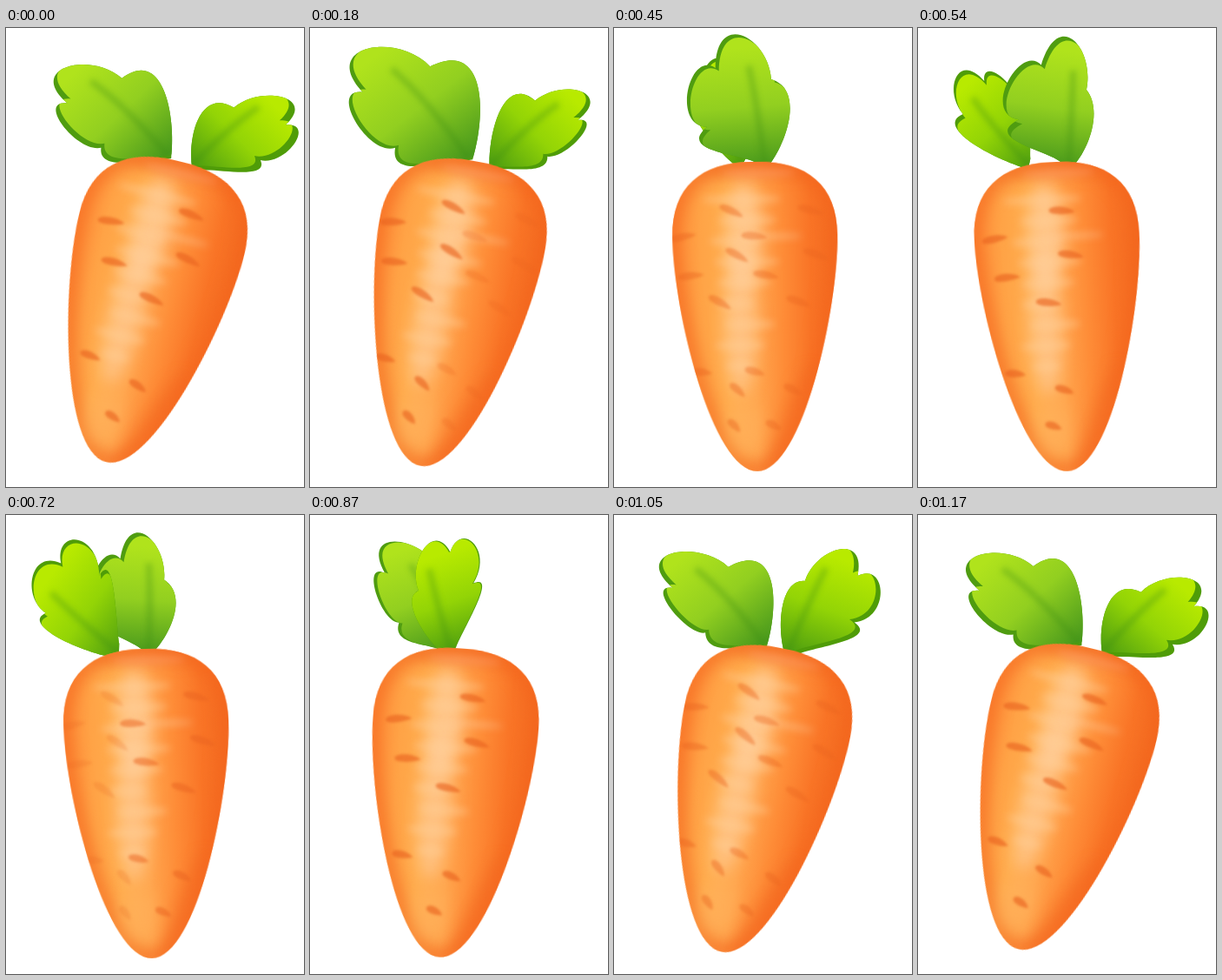
Recreate the animation shown at these times as an HTML page with a canvas. Size 343x528 px, loop 1200 ms.

```html
<!DOCTYPE html>
<html lang="en">
<head>
<meta charset="utf-8">
<title>Spinning carrot</title>
<style>
  html, body { margin: 0; width: 100%; height: 100%; overflow: hidden; background: #fff; }
  canvas { display: block; width: 343px; height: 528px; }
</style>
</head>
<body>
<canvas id="stage" width="343" height="528"></canvas>
<script>
const ctx = document.getElementById('stage').getContext('2d');
const LOOP = 1200, STEP = 30;
const clamp = v => Math.max(0, Math.min(1, v));
const rad = deg => deg * Math.PI / 180;

// A cyclic value: mean, first harmonic (cos, sin), second harmonic (cos, sin).
const wave = (a, [mean, c1 = 0, s1 = 0, c2 = 0, s2 = 0]) =>
  mean + c1 * Math.cos(a) + s1 * Math.sin(a) + c2 * Math.cos(2 * a) + s2 * Math.sin(2 * a);

// Each leaf hangs on four orbiting points: its base, inner lobe, tip and outer lobe.
const leafA = {
  colors: ['#b8ea00', '#93d406', '#4f9f10'], rim: '#4f9c08',
  base: [[176, 50, 8, -4], [159, 3]],
  inner: [[148, 110, 30, -15], [90, -18, -12, 12, 8]],
  tip: [[178, 145, 45, -15], [59, 0, 0, 18, 18]],
  outer: [[218, 130, 25, -18, -12], [80, 42, 30, 10]],
  shift: [[-2, -5], [0, -5]]
};
const leafB = {
  colors: ['#b0e31c', '#92cf20', '#4a9a1c'], rim: '#4f9c10',
  base: [[169, 7, 8, 6], [154, -3]],
  inner: [[178, -24, 5, 2], [58, -22, -10, 10]],
  tip: [[117, -58, 0, 20], [26, 10, -12, 6]],
  outer: [[78, -22, -8, 12], [90, 26, 0, -4]],
  shift: [[4], [0, -5]]
};

const TIP = [.87, .59];
// Lobes as cubic curves between notches, in percent towards the inner and outer lobe.
const LOBES = [
  [[55, -22], [128, -22], [83, 20]],
  [[108, 40], [68, 108], [33, 84]],
  [[24, 118], [-36, 104], [-14, 69]],
  [[-50, 88], [-12, 28], [-5, 8]]
];

function drawLeaf(leaf, angle) {
  const at = ([x, y]) => [wave(angle, x), wave(angle, y)];
  const base = at(leaf.base), inner = at(leaf.inner), tip = at(leaf.tip), outer = at(leaf.outer);
  const [ta, tb] = TIP;
  const flat = (a, b, i) => base[i] + a * (inner[i] - base[i]) + b * (outer[i] - base[i]);
  // Bilinear bend that carries the flat tip onto the real one.
  const map = (a, b) => [0, 1].map(i => flat(a, b, i) + a * b / (ta * tb) * (tip[i] - flat(ta, tb, i)));

  const shape = new Path2D();
  shape.moveTo(...map(.04, -.08));
  for (const lobe of LOBES) shape.bezierCurveTo(...lobe.flatMap(([a, b]) => map(a / 100, b / 100)));
  shape.closePath();

  const light = ctx.createLinearGradient(...tip, ...base);
  leaf.colors.forEach((c, i) => light.addColorStop(.05 + i * .47, c));

  ctx.save();
  ctx.fillStyle = leaf.rim;
  ctx.fill(shape);
  ctx.clip(shape);
  ctx.translate(...at(leaf.shift));
  ctx.fillStyle = light;
  ctx.fill(shape);

  // Soft crease from base towards the tip.
  ctx.filter = 'blur(3px)';
  ctx.strokeStyle = 'rgba(60,140,20,.32)';
  ctx.lineWidth = 7;
  ctx.beginPath();
  ctx.moveTo(...base);
  ctx.quadraticCurveTo(...map(.45, .3), ...map(.64, .55));
  ctx.stroke();
  ctx.restore();
}

// Carrot body, painted once upright around its pivot.
const PIVOT = [163, 309];
const bodyPath = new Path2D('M0-155C60-156 95-128 95-70C95 15 52 201 0 201C-52 201-95 15-95-70C-95-128-60-156 0-155Z');

function paintBody() {
  const cv = document.createElement('canvas');
  cv.width = 200;
  cv.height = 370;
  const g = cv.getContext('2d');
  g.translate(100, 160);
  g.clip(bodyPath);
  const skin = g.createLinearGradient(-95, 0, 95, 0);
  ['#ff8f3a', '#ffa346', '#ffae4e', '#ffa64e', '#fe8c37', '#f97426', '#f36a20']
    .forEach((c, i) => skin.addColorStop(i / 6, c));
  g.fillStyle = skin;
  g.fillRect(-100, -160, 200, 370);

  const blob = (x, y, w, h, color, turn = 0) => {
    g.fillStyle = color;
    g.beginPath();
    g.ellipse(x, y, w, h, turn, 0, 7);
    g.fill();
  };
  g.filter = 'blur(9px)';
  g.strokeStyle = 'rgba(243,100,28,.75)';
  g.lineWidth = 16;
  g.stroke(bodyPath);
  blob(0, -152, 75, 14, 'rgba(243,104,32,.5)');
  blob(40, 150, 14, 70, 'rgba(243,104,32,.5)', .36);
  blob(-13, -70, 20, 62, 'rgba(255,208,158,.75)');
  blob(-18, 30, 18, 85, 'rgba(255,208,158,.65)');
  blob(-16, 150, 20, 34, 'rgba(255,178,95,.55)');

  // Uneven streaks across the highlight.
  g.filter = 'blur(4px)';
  for (let i = 0; i < 9; i++) {
    blob(-15 + 9 * Math.sin(i * 2.3), -112 + i * 24, 38 - i * 2 + 7 * Math.cos(i * 1.9), 5, 'rgba(255,205,150,.5)');
  }
  blob(20, -69, 34, 3, 'rgba(255,200,150,.55)');
  blob(5, -142, 42, 5, 'rgba(255,160,105,.5)');
  return cv;
}
const body = paintBody();

// Spots: height and longitude in degrees at mid-life.
const SPOTS = [[-99, 17], [-70, -38], [-48, 22], [-25, -28], [6, 4], [86, -39], [107, 13], [148, -6]];
const girth = y => 95 * (1 - ((y + 60) / 262) ** 2) ** .75;

function drawSpots(age) {
  const alpha = Math.min(clamp((age - 3) / 3), clamp((18 - age) / 5));
  if (!alpha) return;
  const turned = age - 10, young = 1 - clamp((age - 3) / 5);
  for (const [y, lon] of SPOTS) {
    const x = girth(y) * Math.sin(rad(lon + 6 * turned - lon * .008 * turned ** 2));
    const w = 15 - Math.max(0, y) * .035;
    const slant = lon > -10 ? 45 * young : 0;
    ctx.save();
    ctx.translate(x, y);
    ctx.rotate(rad(7 + y * .07 + x * .2 + slant));
    ctx.globalAlpha = alpha * .65;
    ctx.beginPath();
    ctx.moveTo(-w, 0);
    ctx.bezierCurveTo(-w, -6, w * .4, -6, w, 2);
    ctx.bezierCurveTo(w * .5, 5, -w, 6, -w, 0);
    ctx.fill();
    ctx.restore();
  }
}

function drawCarrot(angle, phase) {
  const sway = Math.cos(angle), lift = ((1 + sway) / 2) ** 2;
  ctx.save();
  ctx.translate(PIVOT[0], PIVOT[1] - 5 * lift);
  ctx.rotate(rad(5.3 + 8.4 * sway));
  ctx.scale(1 + .03 * lift, 1);
  ctx.drawImage(body, -100, -160);
  ctx.clip(bodyPath);
  ctx.filter = 'blur(1.6px)';
  ctx.fillStyle = '#ea6420';
  drawSpots(phase + 10);
  drawSpots(phase);
  ctx.restore();
}

function draw(now) {
  const frame = Math.floor(now % LOOP / STEP), t = frame * STEP;
  const angle = t / LOOP * 2 * Math.PI;
  ctx.fillStyle = '#fff';
  ctx.fillRect(0, 0, 343, 528);
  const order = t > LOOP / 2 ? [leafB, leafA] : [leafA, leafB];
  order.forEach(leaf => drawLeaf(leaf, angle));
  drawCarrot(angle, frame % 10);
}

const start = performance.now();
function tick() {
  draw(performance.now() - start);
  requestAnimationFrame(tick);
}
tick();
</script>
</body>
</html>
```
